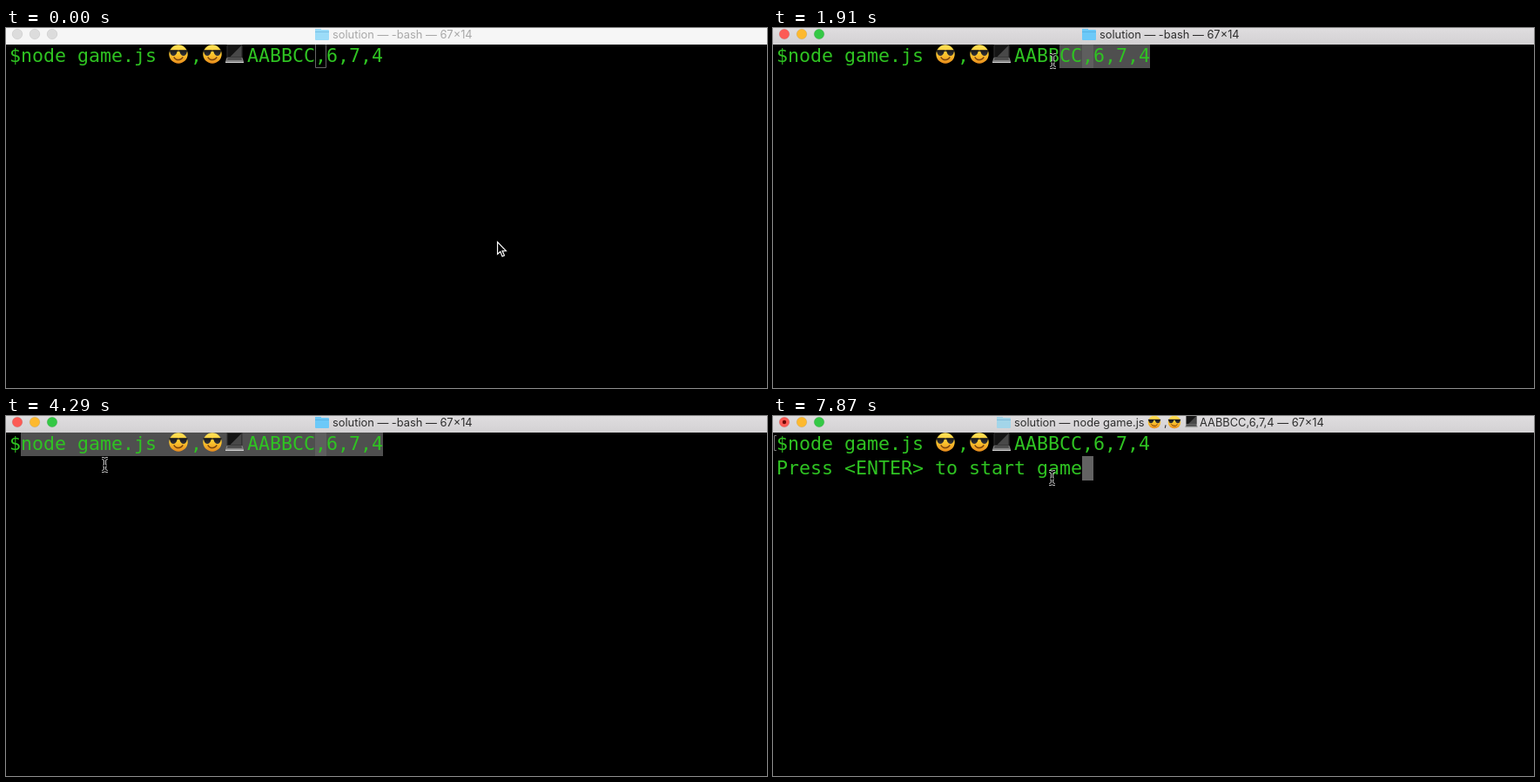
Animation, 874 px wide and 413 px high, one loop 8 s. Source, as an HTML page with a canvas:

```html
<!DOCTYPE html>
<html lang="en">
<head>
<meta charset="utf-8">
<title>Terminal</title>
<style>
html, body { margin: 0; width: 100%; height: 100%; overflow: hidden; background: #000; }
canvas { display: block; }
</style>
</head>
<body>
<canvas id="stage" width="874" height="413"></canvas>
<script>
const ctx = document.getElementById('stage').getContext('2d');
const LOOP = 8000, TICK = 148.4;
const CELL = 13, LEFT = 4, TOP = 18, ROW = 28, BASELINE = 21;
const BAR = 19, MID = 7;
const GREEN = '#2fc322';
const ACTIVATE = 6, SELECT = 11, DESELECT = 31, RUN = 46;
const LINE_END = 33, CURSOR = 27;

// Pointer gestures in ticks: each eases out from wherever the last one ended
const origin = { x: 564, y: 245 };
const gestures = [
  { from: 0, to: 8, x: 447, y: 29, power: 1.5 },
  { from: 8, to: 9, x: 447, y: 37 },
  { from: 10, to: 25, x: 22, y: 41, power: 2.45 },
  { from: 26, to: 29, x: 113, y: 56 },
  { from: 32, to: 37, x: 368, y: 46, power: 1.5, sag: 14 },
  { from: 39, to: 41, x: 389, y: 165 },
  { from: 49, to: 52, x: 248, y: 76 },
  { from: 52, to: 53, x: 320, y: 71 }
];

function pointerAt(tick) {
  let { x, y } = origin;
  for (const g of gestures) {
    const u = Math.min(1, Math.max(0, (tick - g.from) / (g.to - g.from)));
    const e = 1 - (1 - u) ** (g.power || 1);
    x += (g.x - x) * e;
    y += (g.y - y) * e + (g.sag || 0) * Math.sin(Math.PI * e);
  }
  return [Math.round(x), Math.round(y)];
}

const cellX = n => LEFT + n * CELL;

function rect(x, y, w, h, fill) {
  ctx.fillStyle = fill;
  ctx.fillRect(x, y, w, h);
}

function disc(x, y, r, fill) {
  ctx.fillStyle = fill;
  ctx.beginPath();
  ctx.arc(x, y, r, 0, Math.PI * 2);
  ctx.fill();
}

function polygon(points, fill) {
  ctx.fillStyle = fill;
  ctx.beginPath();
  points.forEach(([x, y]) => ctx.lineTo(x, y));
  ctx.closePath();
  ctx.fill();
}

// Symmetric trapezoid around x = 0
function slab(y0, half0, y1, half1, fill) {
  polygon([[-half0, y0], [half0, y0], [half1, y1], [-half1, y1]], fill);
}

function outline(color, width) {
  ctx.strokeStyle = color;
  ctx.lineWidth = width;
  ctx.stroke();
}

function gradient(y0, y1, ...colors) {
  const g = ctx.createLinearGradient(0, y0, 0, y1);
  colors.forEach((c, i) => g.addColorStop(i / (colors.length - 1), c));
  return g;
}

// Run a drawing in a unit system centred on x, y
function at(x, y, scale, draw) {
  ctx.save();
  ctx.translate(x, y);
  ctx.scale(scale, scale);
  draw();
  ctx.restore();
}

function face(x, y, size) {
  at(x, y, size / 22, () => {
    disc(0, 0, 10.7, gradient(-11, 11, '#ffe25a', '#fcc72f', '#e88b1c'));
    ctx.beginPath();
    ctx.arc(0, 0.5, 6, 0.5, Math.PI - 0.5);
    outline('#7a430c', 1.4);
    rect(-10.5, -4.6, 21, 1.4, '#1d1a18');
    for (const side of [-1, 1]) {
      ctx.fillStyle = gradient(-4, 2, '#17181b', '#37363a');
      ctx.beginPath();
      ctx.moveTo(side, -4.4);
      ctx.lineTo(side * 10, -4.4);
      ctx.quadraticCurveTo(side * 9.8, 2, side * 5.8, 2);
      ctx.quadraticCurveTo(side * 2, 2, side, -4.4);
      ctx.fill();
    }
  });
}

function laptop(x, y, size) {
  at(x, y, size / 22, () => {
    slab(-11, 9, 4, 9, '#333');
    slab(-10, 8, 3, 8, '#141414');
    polygon([[8, -10], [8, 3], [-5, 3]], '#484848');
    slab(4, 9, 8.5, 10.5, '#808080');
    slab(4.6, 8, 6.5, 8.5, '#3d3d3d');
    slab(8.5, 10.5, 10, 10.5, '#cfcfcf');
  });
}

function folder(x, color) {
  rect(x, 1, 7, 3, color);
  ctx.fillStyle = color;
  ctx.beginPath();
  ctx.roundRect(x, 2, 16, 12, 1);
  ctx.fill();
  rect(x, 4, 16, 1, 'rgba(40,130,185,0.3)');
}

function titleBar(active, running) {
  rect(0, 0, 874, BAR, active ? gradient(0, BAR, '#dfdddf', '#d3d1d3') : '#f6f6f6');
  const colors = active ? ['#fc5b55', '#fdb92f', '#34c845'] : Array(3).fill('#dcdcdc');
  colors.forEach((color, i) => {
    disc(13 + 20 * i, MID, 5.8, color);
    outline('rgba(0,0,0,0.1)', 0.8);
  });
  if (running) disc(13, MID, 2.2, '#6f0906');

  ctx.font = '12.85px Inter, sans-serif';
  ctx.fillStyle = active ? '#2c2c2c' : '#a8a8a8';
  if (!running) {
    ctx.fillText('solution — -bash — 67×14', 375, 12);
    folder(355, active ? '#6cc9f8' : '#9cdcf8');
    return;
  }
  ctx.fillText('solution — node game.js', 277, 12);
  ctx.fillText(',', 449, 12);
  ctx.fillText('AABBCC,6,7,4 — 67×14', 490, 12);
  folder(257, '#a3d5e9');
  face(438, MID, 15);
  face(461, MID, 15);
  laptop(480.5, MID, 15);
}

function cursor(active, row, selected) {
  const y = TOP + row * ROW;
  if (active) {
    rect(cellX(CURSOR), y, CELL, ROW, selected ? '#5e5e5e' : '#626262');
  } else {
    ctx.beginPath();
    ctx.rect(cellX(CURSOR) + 0.5, y + 0.5, CELL - 1, ROW - 1);
    outline('#666', 1);
  }
}

function bracket() {
  ctx.beginPath();
  ctx.moveTo(4, 22.5);
  ctx.lineTo(1.5, 22.5);
  ctx.lineTo(1.5, 39.5);
  ctx.lineTo(4, 39.5);
  outline('#777', 1);
}

function type(text, cell, row = 0) {
  ctx.fillText(text, cellX(cell), TOP + row * ROW + BASELINE);
}

function terminal(active, running, selectFrom) {
  rect(cellX(selectFrom), TOP, cellX(LINE_END) - cellX(selectFrom), ROW, '#4f4f4f');
  cursor(active, running ? 1 : 0, selectFrom <= CURSOR);
  if (running) bracket();

  ctx.font = '21.6px "DejaVu Sans Mono", monospace';
  ctx.fillStyle = GREEN;
  type('$node game.js', 0);
  type(',', 16);
  type('AABBCC,6,7,4', 21);
  if (running) type('Press <ENTER> to start game', 0, 1);

  face(cellX(15) - 1, 30, 22);
  face(cellX(18) - 1, 30, 22);
  laptop(cellX(20) - 1.5, 30, 22);
}

function arrow(x, y) {
  at(x, y, 1, () => {
    polygon([[0.5, 0.5], [0.5, 14.5], [3.7, 11.6], [6, 17], [8.4, 16], [6, 10.8], [10.3, 10.6]], '#000');
    outline('#fff', 1.2);
  });
}

function beam(x, y) {
  at(x + 0.5, y, 1, () => {
    ctx.beginPath();
    for (const s of [-1, 1]) {
      ctx.moveTo(-3.5, s * 7.5);
      ctx.quadraticCurveTo(0, s * 7.5, 0, s * 5);
      ctx.quadraticCurveTo(0, s * 7.5, 3.5, s * 7.5);
    }
    ctx.moveTo(0, -6);
    ctx.lineTo(0, 6);
    ctx.moveTo(-2, 1);
    ctx.lineTo(2, 1);
    outline('#eee', 3.2);
    outline('#000', 1.4);
  });
}

// First selected cell; the selection trails the pointer while dragging
function selectionStart(tick) {
  if (tick < SELECT || tick >= DESELECT) return LINE_END;
  const [x] = pointerAt(Math.min(tick, 26) - 0.15);
  return Math.min(LINE_END, Math.round((x - LEFT) / CELL));
}

function render(time) {
  const tick = Math.floor((time + 16) / TICK);
  const active = tick >= ACTIVATE, running = tick >= RUN;
  rect(0, 0, 874, 413, '#000');
  terminal(active, running, selectionStart(tick));
  titleBar(active, running);
  (active ? beam : arrow)(...pointerAt(tick));
}

const start = performance.now();
function loop() {
  render((performance.now() - start) % LOOP);
  requestAnimationFrame(loop);
}
loop();
</script>
</body>
</html>
```
